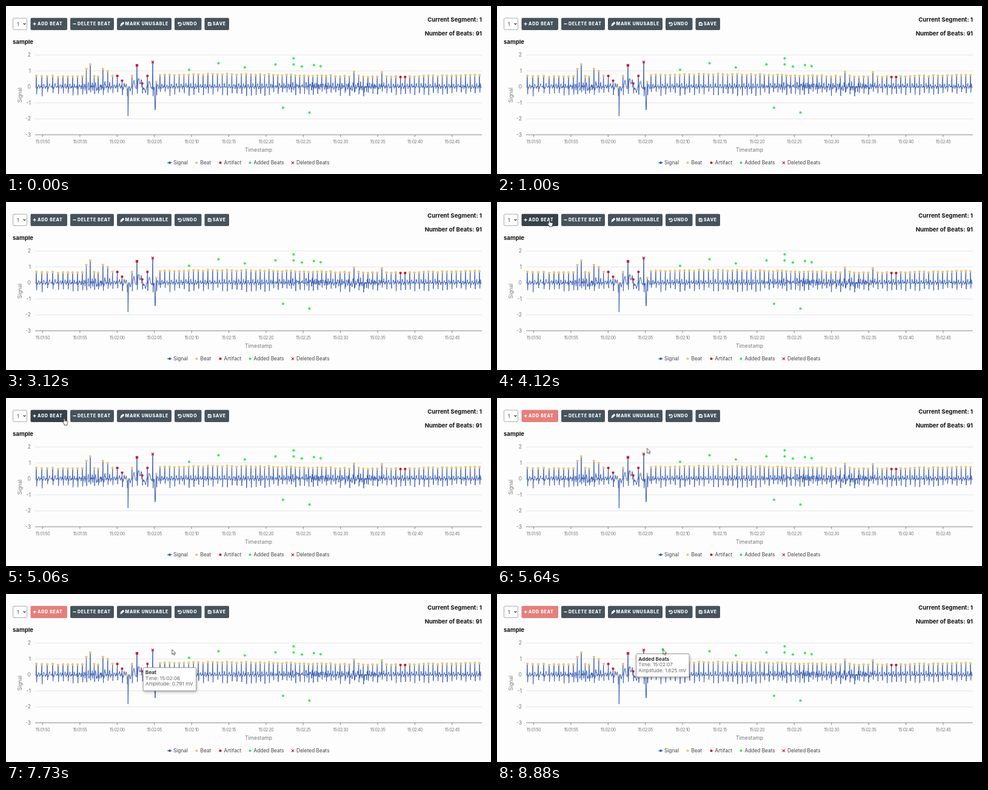
An HTML page that plays this animation: 800 px wide and 279 px high, repeating every 8.91 s.

```html
<!DOCTYPE html>
<html lang="en">
<head>
<meta charset="utf-8">
<title>Beat editor</title>
<style>
html, body { margin: 0; width: 100%; height: 100%; overflow: hidden; background: #fefdfe; }
svg { display: block; width: 800px; height: 279px; font-family: Inter, sans-serif; }
.head { font-size: 9.6px; font-weight: 700; fill: #111; }
.label { font-size: 7px; font-weight: 800; letter-spacing: .75px; fill: #fff; }
.icon { fill: none; stroke: #fff; stroke-width: 1.3; }
.axis { font-size: 8.6px; fill: #777; }
.tick { font-size: 7px; letter-spacing: -.45px; fill: #777; }
.legend { font-size: 8.3px; fill: #444; }
.tip { font-size: 8.2px; fill: #666; }
.tip .title { font-weight: 700; fill: #333; }
.box { fill: #fff; stroke: #999; filter: drop-shadow(1px 2px 2px #0004); }

#add, #cursor, #hand, #arrow, #tip, #beatTip, #newTip, #newBeat { animation: 8910ms infinite; }
#add { animation-name: add; animation-timing-function: step-end; }
#cursor { animation-name: move; animation-timing-function: ease-in-out; }
#hand { animation-name: hand; animation-timing-function: step-end; }
#arrow { animation-name: arrow; animation-timing-function: step-end; }
#tip { animation-name: tip; animation-timing-function: ease-out; }
#beatTip { animation-name: before; animation-timing-function: step-end; }
#newTip, #newBeat { animation-name: after; animation-timing-function: step-end; }

@keyframes add {
  0% { fill: #46535c; }
  44.9% { fill: #36424a; }
  58.4%, 100% { fill: #e57f7c; }
}
@keyframes move {
  0%, 42.09% { transform: translate(150px, 150px); }
  45.79%, 49.38% { transform: translate(86px, 30px); }
  53.65%, 59.04% { transform: translate(96px, 34px); }
  64.87%, 100% { transform: translate(273.5px, 92px); }
}
@keyframes hand {
  0% { visibility: hidden; }
  44.9% { visibility: visible; }
  60.4%, 100% { visibility: hidden; }
}
@keyframes arrow {
  0% { visibility: hidden; }
  42.2% { visibility: visible; }
  44.9% { visibility: hidden; }
  60.4%, 100% { visibility: visible; }
}
@keyframes tip {
  0%, 63.9% { transform: translate(221px, 122px); opacity: 0; }
  66.3% { transform: translate(225px, 122px); opacity: 1; }
  67%, 91.47% { transform: translate(226.2px, 122.3px); opacity: 1; }
  94.28%, 100% { transform: translate(229.5px, 99.3px); opacity: 1; }
}
@keyframes before {
  0% { visibility: visible; }
  91.47%, 100% { visibility: hidden; }
}
@keyframes after {
  0% { visibility: hidden; }
  91.47%, 100% { visibility: visible; }
}
</style>
</head>
<body>
<svg viewBox="0 0 800 279">
  <rect x="11.5" y="20.2" width="23" height="19" rx="1.5" fill="#fff" stroke="#aaa"/>
  <text x="18" y="32.5" font-size="8" fill="#333">1</text>
  <path d="M28.5 28.7l2 2 2-2" fill="none" stroke="#333" stroke-width="1.2"/>
  <g id="buttons"></g>
  <g class="head">
    <text x="785" y="25.8" text-anchor="end">Current Segment: 1</text>
    <text x="785" y="49.3" text-anchor="end">Number of Beats: 91</text>
    <text x="11" y="63.2">sample</text>
  </g>
  <g id="axes"></g>
  <text class="axis" transform="translate(26 148) rotate(-90)" text-anchor="middle">Signal</text>
  <text class="axis" x="416.5" y="241.5" text-anchor="middle">Timestamp</text>
  <path id="signal" fill="none" stroke="#3f62b3" stroke-linejoin="round"/>
  <g id="marks"></g>
  <circle id="newBeat" cx="273.5" cy="92" r="2.2" fill="#35ee4d"/>
  <g id="legend"></g>
  <g id="tip" class="tip">
    <rect class="box" width="87.5" height="38.5" rx="2"/>
    <g id="beatTip">
      <text class="title" x="3.8" y="11">Beat</text>
      <text x="3.8" y="20.4">Time: 15:02:06</text>
      <text x="3.8" y="29.8">Amplitude: 0.791 mV</text>
    </g>
    <g id="newTip">
      <text class="title" x="3.8" y="11.5">Added Beats</text>
      <text x="3.8" y="20.9">Time: 15:02:07</text>
      <text x="3.8" y="30.3">Amplitude: 1.625 mV</text>
    </g>
  </g>
  <g id="cursor" fill="#fff" stroke="#333" stroke-width=".8" stroke-linejoin="round">
    <path id="arrow" d="M.3 0v8.4l2-1.8 1.4 3 1.4-.7-1.4-2.8h2.6z"/>
    <path id="hand" d="M-.8 1Q.2-.4 1.1 1V4.2L2 3.6 2.8 4.4 3.7 3.9 4.5 4.8 5.5 4.6Q6.2 5 6 6.5L5 9V11H0V9.4L-2.6 6.2Q-2.7 5-1.6 5.4L-.8 6.2z"/>
  </g>
</svg>
<script>
const NS = 'http://www.w3.org/2000/svg';
const $ = id => document.getElementById(id);

function add(parent, tag, attrs, text) {
  const el = document.createElementNS(NS, tag);
  for (const key in attrs) el.setAttribute(key, attrs[key]);
  if (text) el.textContent = text;
  $(parent).append(el);
}
const dot = (parent, x, y, fill) => add(parent, 'circle', { cx: x, cy: y, r: 2.1, fill });
const cross = (parent, x, y) => add(parent, 'path', {
  d: `M${x - 2} ${y - 2}l4 4m0-4l-4 4`, stroke: '#d3101c', 'stroke-width': 1.2
});
const BEAT = '#ecc673', ARTIFACT = '#d3101c', ADDED = '#35ee4d', LINE = '#3f62b3';

// Toolbar: label, width, label inset, icon centred on 0,0
let left = 40.5;
[['ADD BEAT', 60.5, 11.6, 'M-2.5 0h5M0-2.5v5'],
  ['DELETE BEAT', 72, 12, 'M-2.5 0h5'],
  ['MARK UNUSABLE', 90, 13.6, 'M-2.3 2.8L-1.5 0 1.5-2.6 2.8-1.2-.5 2zM-.8.6L1.8-2'],
  ['UNDO', 44.5, 13.4, 'M-2.4-3v2.6h2.6M-2.2-.7a2.6 2.6 0 1 1 .6 2.8'],
  ['SAVE', 40.5, 13.4, 'M-2.4-2.4h3.6l1.2 1.2v3.6h-4.8zM-1.4-1.2h2M-.6 1.2h1.2']
].forEach(([label, width, inset, icon], i) => {
  add('buttons', 'rect', {
    x: left, y: 19.7, width, height: 20.2, rx: 2, fill: '#46535c', ...(i ? {} : { id: 'add' })
  });
  add('buttons', 'path', { d: icon, class: 'icon', transform: `translate(${left + inset - 5} 29.7)` });
  add('buttons', 'text', { x: left + inset, y: 32.2, class: 'label' }, label);
  left += width + 5;
});

// Axes
for (let v = 2; v >= -3; v--) {
  const y = 134.4 - 26.5 * v, color = v > -3 ? '#e4e4ea' : '#888';
  add('axes', 'path', { d: `M48 ${y}H785`, stroke: color });
  add('axes', 'text', { x: 41, y: y + 2.7, class: 'axis', 'text-anchor': 'end' }, String(v));
}
for (let i = 0; i < 12; i++) {
  const x = 60.5 + i * 61.4, s = (50 + i * 5) % 60;
  add('axes', 'path', { d: `M${x} 214v3.5`, stroke: '#888' });
  add('axes', 'text', { x, y: 228, class: 'tick', 'text-anchor': 'middle' },
    `15:0${i < 2 ? 1 : 2}:${String(s).padStart(2, '0')}`);
}

let seed = 11;
const rand = () => (seed = seed * 16807 % 2147483647) / 2147483647;
const bell = (x, mid, width) => Math.exp(-(((x - mid) / width) ** 2));

// Beats run at an even pace between key beats [index, x]
const pace = [[0, 50], [4, 86], [9, 126], [13, 152], [18, 191.5], [21, 216], [24, 242], [26, 254],
  [46, 412], [62, 528], [95, 781]];
function beatX(i) {
  const k = Math.max(1, pace.findIndex(p => p[0] >= i));
  const [i0, x0] = pace[k - 1], [i1, x1] = pace[k];
  return x0 + (x1 - x0) * (i - i0) / (i1 - i0);
}
// Unusual peaks; the others vary slowly around one height
const odd = { 10: 104.5, 11: 97, 14: 104.5, 15: 108, 18: 124, 19: 135, 21: 98.5, 22: 128.5,
  24: 93, 25: 126, 68: 109, 74: 110 };
const beatY = i => odd[i] ?? 115.3 - 1.8 * Math.cos((i - 41) * .0924) + (rand() - .5) * 2;
const beats = Array.from({ length: 96 }, (_, i) => [beatX(i), beatY(i)]);

// Signal: P, QRS and T waves with noise and one disturbed stretch
const drift = x => 9 * Math.sin(x * .5) * bell(x, 225, 24)
  + 50 * bell(x, 201, .9) - 22 * bell(x, 218, 1.5) + 42 * bell(x, 246, .9);
const noise = x => 1.8 + 4.5 * bell(x, 505, 40) + 6 * bell(x, 586, 30) + 4 * bell(x, 145, 25);

const points = [];
beats.forEach(([x, y], i) => {
  const next = i < 95 ? beats[i + 1][0] : 785;
  points.push([x - .6, 135], [x, y], [x + .6, 142 + rand() * 8], [x + 1.1, 135]);
  for (let s = x + 1.6; s < next - .8; s += .55) {
    const u = (s - x) / (next - x);
    const wave = 136.5 - 7 * bell(u, .42, .13) - 4 * bell(u, .82, .08);
    points.push([s, wave + drift(s) + (rand() - .5) * 2 * noise(s)]);
  }
});
$('signal').setAttribute('d', 'M48.5 135L' + points.map(p => p.map(n => n.toFixed(1)).join(' ')).join('L'));

// Markers
const artifacts = [17, 18, 21, 22, 23, 78, 79], deleted = [21, 24];
beats.forEach(([x, y], i) => {
  if (i !== 24) dot('marks', x, y, artifacts.includes(i) ? ARTIFACT : BEAT);
  if (deleted.includes(i)) cross('marks', x, y);
});
[[302, 106], [350.5, 95], [394, 102], [444.5, 97], [474.5, 87], [474.5, 97], [488, 100.5], [508, 98],
  [519, 100], [457, 169], [500.5, 177]].forEach(([x, y]) => dot('marks', x, y, ADDED));

// Legend
add('legend', 'path', { d: 'M266 260.3h7.5', stroke: LINE, 'stroke-width': 1.2 });
[[270, 'Signal', LINE], [314.5, 'Beat', BEAT], [353.5, 'Artifact', ARTIFACT],
  [402.5, 'Added Beats', ADDED], [473, 'Deleted Beats']].forEach(([x, label, fill]) => {
  fill ? dot('legend', x, 260.3, fill) : cross('legend', x, 260.3);
  add('legend', 'text', { x: x + 6, y: 263.2, class: 'legend' }, label);
});
</script>
</body>
</html>
```
